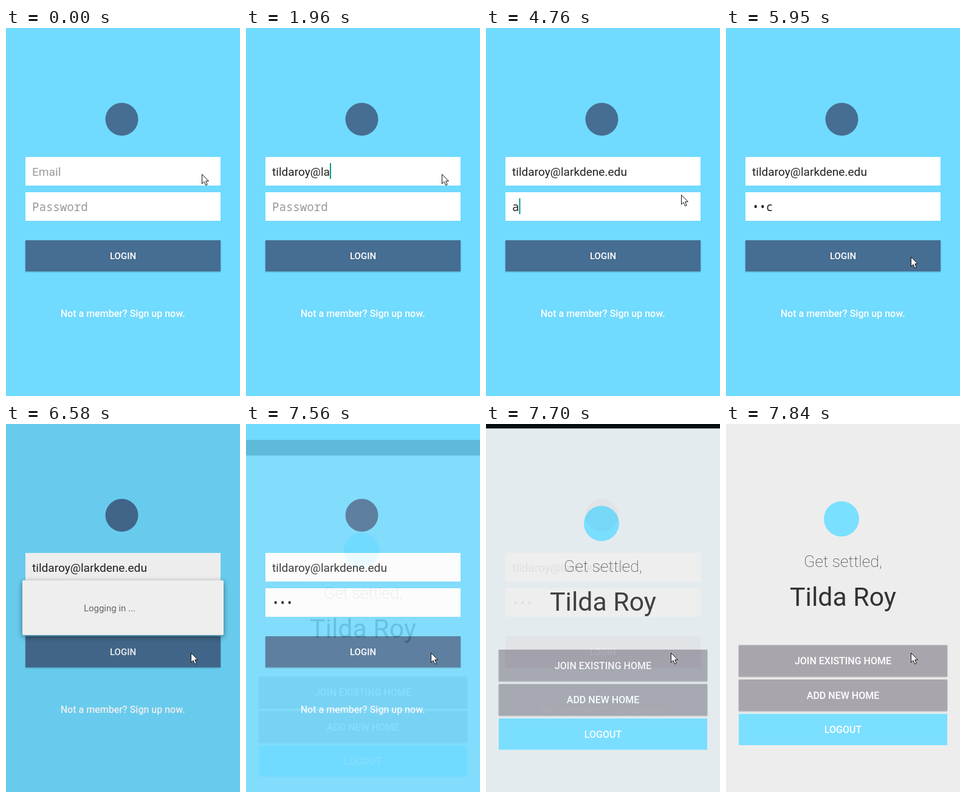
Write an HTML page that moves like this. It is 385 px wide and 605 px high and loops after 8960 ms.

```html
<!DOCTYPE html>
<html lang="en">
<head>
<meta charset="utf-8">
<title>Login flow</title>
<style>
  html, body { margin: 0; width: 100%; height: 100%; overflow: hidden; background: #70daff; }
  svg { display: block; width: 385px; height: 605px; font-family: Roboto, sans-serif; }
  text { white-space: pre; }
  .mid { text-anchor: middle; }
  .input { font-size: 19.1px; fill: #212121; }
  .input.hint { fill: #999; }
  .mono { font-family: "Noto Sans Mono", monospace; }
  .label { font-size: 16px; font-weight: 500; fill: #fff; }
  .caret { fill: #009688; }
  .raised { filter: drop-shadow(0 1.5px 0.8px rgba(0, 0, 0, .3)); }
  .panel { fill: #eee; filter: drop-shadow(0 3px 5px rgba(0, 0, 0, .45)); }
</style>
</head>
<body>
<svg viewBox="0 0 385 605">
  <g id="login">
    <rect width="385" height="605" fill="#70daff"/>
    <circle cx="190.5" cy="150" r="27" fill="#466d92"/>
    <rect x="32" y="212" width="321" height="47" fill="#fff"/>
    <rect x="32" y="270" width="321" height="47" fill="#fff"/>
    <text id="email" class="input" x="43" y="243"></text>
    <rect id="emailCaret" class="caret" y="222" width="2" height="26"/>
    <text id="pass" class="input mono" x="43" y="301"></text>
    <rect id="passCaret" class="caret" y="280" width="2" height="26"/>
    <rect id="button" class="raised" x="32" y="349" width="321" height="51" fill="#466d92"/>
    <text class="label mid" x="192.5" y="380.3" style="font-size:15px">LOGIN</text>
    <text class="label mid" x="192.2" y="474.8">Not a member? Sign up now.</text>
  </g>

  <rect id="dim" width="385" height="605"/>
  <g id="dialog">
    <rect class="panel" x="17" y="254.3" width="351" height="95.4" rx="2"/>
    <text x="124" y="308.4" font-size="15.9" fill="#666">Logging in ...</text>
  </g>

  <g id="home">
    <rect y="-25.7" width="385" height="25.7"/>
    <rect width="385" height="605" fill="#ededed"/>
    <circle cx="190" cy="156" r="29" fill="#7bdfff"/>
    <text class="mid" x="192.5" y="235" font-size="26.7" font-weight="100" fill="#333">Get settled,</text>
    <text class="mid" x="192.5" y="299" font-size="42.8" fill="#333">Tilda Roy</text>
    <rect class="raised" x="21" y="363.5" width="343" height="51.5" fill="#aaa5ad"/>
    <rect class="raised" x="21" y="420" width="343" height="51.5" fill="#aaa5ad"/>
    <rect x="21" y="476.5" width="343" height="51.5" fill="#7bdfff"/>
    <text class="label mid" x="192.5" y="395.2">JOIN EXISTING HOME</text>
    <text class="label mid" x="192.5" y="451.8">ADD NEW HOME</text>
    <text class="label mid" x="192.5" y="508.3">LOGOUT</text>
  </g>

  <path id="pointer" d="M.5 .5V16L4 12.7L6.6 18.6L9.2 17.5L6.7 11.7H11.4Z" fill="#fff" stroke="#111"/>
</svg>

<script>
const LOOP = 8960, TICK = 70;
const $ = id => document.getElementById(id);
const every = (start, gap, n) => Array.from({ length: n }, (_, i) => start + gap * i);

const address = "tildaroy@larkdene.edu";
const keyTimes = [
  ...every(210, 140, 8), 1470, 1680,
  ...every(1960, 105, 7).map(t => Math.floor(t / TICK) * TICK),
  ...every(3080, 140, 4)
];
const passwords = [[0, ""], [4760, "a"], [5110, "•b"], [5390, "••c"], [6790, "•••"]];
const pointerPath = [
  [0, 322, 240], [3920, 322, 247], [3990, 321, 265], [4060, 321, 274],
  [5530, 320, 282], [5600, 317, 303], [5670, 313, 333], [5740, 308, 358],
  [5810, 305, 372], [5950, 304, 376]
];
// time, dialog opacity, dialog scale, dim
const dialogSteps = [
  [0, 0, 1, 0], [6510, .3, .91, .02], [6580, 1, .943, .072], [6650, 1, .99, .25],
  [6720, .9, 1, .28], [6790, .35, .98, .12], [6860, 0, 1, 0]
];
const shadowSteps = [[0, 1.5, .8], [6160, 2.5, 1.2], [6230, 4, 1.5], [6510, 1.5, .8]];

const at = (steps, t) => steps.filter(s => s[0] <= t).pop();
const decel = (x, power) => 1 - (1 - Math.min(1, x)) ** power;

function setInput(id, value, hint, caretOn) {
  const el = $(id), caret = $(id + "Caret");
  el.textContent = value || hint;
  el.classList.toggle("hint", !value);
  caret.style.visibility = caretOn ? "visible" : "hidden";
  caret.setAttribute("x", 43 + (value ? el.getComputedTextLength() : 0));
}

function draw(t) {
  const typed = keyTimes.filter(k => k <= t).length;
  setInput("email", address.slice(0, typed), "Email", t >= 210 && t < 3990);
  setInput("pass", at(passwords, t)[1], "Password", t >= 4410 && t < 5950);

  const [, drop, blur] = at(shadowSteps, t);
  $("button").style.filter = `drop-shadow(0 ${drop}px ${blur}px rgba(0,0,0,.3))`;

  const [, alpha, scale, dim] = at(dialogSteps, t);
  $("dim").setAttribute("opacity", dim);
  $("dialog").setAttribute("opacity", alpha);
  $("dialog").setAttribute("transform", `translate(192.5 302) scale(${scale}) translate(-192.5 -302)`);

  // The home screen rises while it fades in.
  const open = t < 7560 ? 0 : Math.max(10, t - 7581);
  const rise = t < 7840 ? 60 * (1 - decel(open / 350, 5)) : 0;
  $("home").setAttribute("opacity", decel(open / 200, 3));
  $("home").setAttribute("transform", `translate(0 ${rise})`);

  const [, x, y] = at(pointerPath, t);
  $("pointer").setAttribute("transform", `translate(${x} ${y})`);
}

const start = performance.now();
let shown = -1;
function frame() {
  const time = (performance.now() - start) % LOOP;
  const t = Math.floor(time / TICK) * TICK;
  if (t !== shown) draw(shown = t);
  requestAnimationFrame(frame);
}
frame();
</script>
</body>
</html>
```
